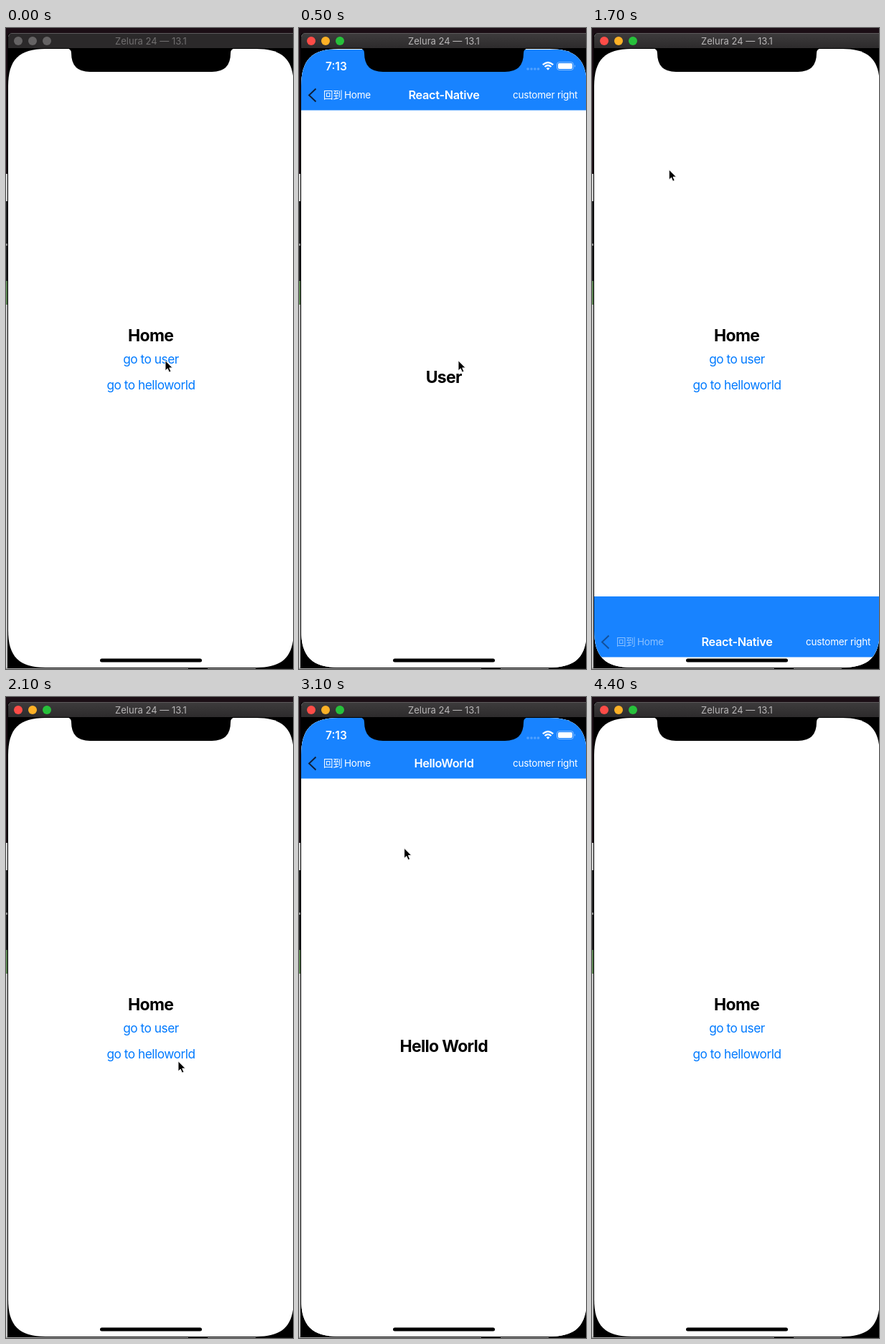
These frames come from a looping animation (400 px wide and 892 px high, 4.6 s). An HTML page:

```html
<!DOCTYPE html>
<html lang="en">
<head>
<meta charset="utf-8">
<title>Modal navigation</title>
<style>
  html, body { margin: 0; width: 100%; height: 100%; overflow: hidden; background: #000; }
  svg { display: block; width: 400px; height: 892px; }
  text { font-family: Inter, "Noto Sans CJK SC", "Noto Sans CJK", sans-serif; }
  .mid { text-anchor: middle; }
  .heading { font-size: 23px; font-weight: 700; letter-spacing: -.7px; }
  .link { font-size: 17.3px; letter-spacing: -.5px; fill: #007aff; }
  .title { font-size: 16.3px; font-weight: 600; letter-spacing: -.3px; fill: #fff; }
  .small { font-size: 13.5px; letter-spacing: -.2px; fill: #fff; }
  .clock { font-size: 15.5px; font-weight: 600; fill: #fff; }
  .caption { font-size: 13px; fill: #b8b6b7; }
  .inactive .caption { fill: #706e6f; }
  .inactive .light { fill: #656364; }
  .inactive .bar { fill: #2b292a; }
</style>
</head>
<body>
<svg viewBox="0 0 400 892">
  <defs>
    <linearGradient id="barFill" x2="0" y2="1">
      <stop stop-color="#3d3b3c"/><stop offset="1" stop-color="#2d2b2c"/>
    </linearGradient>
    <clipPath id="screen">
      <path d="M3 81C3 44.200 18.200 29 55 29H349C385.800 29 401 44.200 401 81V838C401 874.800 385.800 890 349 890H55C18.200 890 3 874.800 3 838Z"/>
    </clipPath>
  </defs>

  <!-- desktop behind the window -->
  <rect width="400" height="892" fill="#1b0e15"/>
  <rect y="203" width="3" height="38" fill="#d2d2d2"/>
  <rect y="241" width="3" height="111" fill="#1d1d1f"/>
  <rect y="300" width="2" height="3" fill="#8a8a8a"/>
  <rect y="352" width="3" height="33" fill="#58804f"/>
  <rect y="385" width="3" height="507" fill="#c4c4c4"/>
  <rect y="890" width="400" height="2" fill="#a8a8a8"/>
  <path d="M254 890h27v2h-27zM348 890h52v2h-52z" fill="#111"/>

  <!-- window -->
  <g id="window">
    <path d="M2 891V12Q2 7 7 7H400V891Z" fill="#000"/>
    <path class="bar" d="M3 28V13Q3 8 8 8H400V28Z" fill="url(#barFill)"/>
    <path d="M3.500 12Q4 7.500 8 7.500H400" fill="none" stroke="#5d5a5c"/>
    <circle class="light" cx="17" cy="18" r="6" fill="#fd4c47"/>
    <circle class="light" cx="37" cy="18" r="6" fill="#fdb126"/>
    <circle class="light" cx="57" cy="18" r="6" fill="#27c13b"/>
    <text class="caption mid" x="202" y="23">Zelura 24 — 13.1</text>
  </g>

  <g clip-path="url(#screen)">
    <rect x="3" y="29" width="398" height="861" fill="#fff"/>
    <text class="heading mid" x="201.700" y="436">Home</text>
    <text class="link mid" x="202" y="467">go to user</text>
    <text class="link mid" x="202" y="503">go to helloworld</text>
    <g id="sheets"></g>

    <!-- white status bar, only visible over a blue header -->
    <text class="clock" x="37" y="58.500">7:13</text>
    <g fill="#fff">
      <g opacity=".25">
        <circle cx="319" cy="57" r="1.800"/><circle cx="324" cy="57" r="1.800"/>
        <circle cx="328.800" cy="57" r="1.800"/><circle cx="333.500" cy="57" r="1.800"/>
      </g>
      <g fill="none" stroke="#fff" stroke-width="2.300">
        <path d="M339.800 51.200Q347 44.800 354.200 51.200"/>
        <path d="M342.500 54Q347 50 351.500 54"/>
      </g>
      <path d="M344.500 56.100Q347 54.200 349.500 56.100L347 58.700Z"/>
      <rect x="359.500" y="47.500" width="23" height="11" rx="3.300" fill="none" stroke="#fff" opacity=".45"/>
      <path d="M384 51.300Q386 53 384 54.800Z" opacity=".5"/>
      <rect x="361" y="49" width="20" height="8" rx="2"/>
    </g>
  </g>

  <path d="M85 28.500Q91 29 91 35Q91 61 117 61H287Q313 61 313 35Q313 29 319 28.500Z"/>
  <rect x="131" y="877.500" width="142" height="5" rx="2.500"/>
  <path id="cursor" d="M0 0V14.200L3.200 11.200L5.400 16.300L7.900 15.200L5.700 10.200H10.200Z" stroke="#fff" stroke-width=".9"/>
</svg>

<script>
const LOOP = 4600, STEP = 100, SLIDE = 400, HEIGHT = 861;

const sheets = [
  { title: "React-Native", heading: "User", open: 130, close: 1552 },
  { title: "HelloWorld", heading: "Hello World", open: 2500.3, close: 3676.4 }
];

// time, x, y
const path = [
  [0, 222, 463], [700, 222, 463], [1000, 130, 240], [1300, 66, 96],
  [1600, 66, 96], [1900, 190, 400], [2100, 240, 507], [2300, 236, 503],
  [2500, 227, 494], [2700, 227, 494], [3000, 180, 256], [3300, 80, 120],
  [3500, 47, 90], [3800, 47, 90], [4100, 415, 30], [4600, 415, 30]
];

const $ = id => document.getElementById(id);
const clamp = v => Math.min(1, Math.max(0, v));
const mix = (a, b, k) => a + (b - a) * k;

function bezier(x1, y1, x2, y2) {
  const at = (a, b, s) => 3 * a * s * (1 - s) ** 2 + 3 * b * s * s * (1 - s) + s ** 3;
  return x => {
    if (x <= 0 || x >= 1) return clamp(x);
    let lo = 0, hi = 1;
    for (let i = 0; i < 24; i++) {
      const s = (lo + hi) / 2;
      if (at(x1, x2, s) < x) lo = s; else hi = s;
    }
    return at(y1, y2, lo);
  };
}
const ease = bezier(0.2833, 0.99, 0.31833, 0.99);

$("sheets").innerHTML = sheets.map(s => `
  <g>
    <rect x="3" y="29" width="398" height="862" fill="#fff"/>
    <rect x="3" y="29" width="398" height="84.500" fill="#1883ff"/>
    <g class="back">
      <path d="M23.500 83.500L14 92.500L23.500 101.500" fill="none" stroke="#0d1d38" stroke-width="1.900"/>
      <text class="small" x="34" y="97">回到</text>
      <text class="small" x="63" y="97">Home</text>
    </g>
    <text class="title mid" x="202" y="98">${s.title}</text>
    <text class="small" x="298" y="97">customer right</text>
    <text class="heading mid" x="201.700" y="493.500">${s.heading}</text>
  </g>`).join("");
sheets.forEach((s, i) => {
  s.node = $("sheets").children[i];
  s.back = s.node.querySelector(".back");
});

function cursorAt(t) {
  const i = path.findIndex(p => p[0] > t);
  const [a, b] = [path[i - 1], path[i]];
  const k = (t - a[0]) / (b[0] - a[0]);
  return [mix(a[1], b[1], k), mix(a[2], b[2], k)];
}

function draw(t) {
  for (const s of sheets) {
    const shown = ease((t - s.open) / SLIDE) - ease((t - s.close) / SLIDE);
    s.node.setAttribute("transform", `translate(0 ${(HEIGHT * (1 - shown)).toFixed(2)})`);
    s.node.style.display = shown > 0 ? "" : "none";
    // the pressed back button dims, then recovers
    const since = t - s.close;
    s.back.setAttribute("opacity", since < 0 ? 1 : mix(0.18, 1, clamp((since - 50) / 250)));
  }
  const [x, y] = cursorAt(t);
  $("cursor").setAttribute("transform", `translate(${x} ${y - 0.3})`);
  $("window").setAttribute("class", t < STEP ? "inactive" : "");
}

const start = performance.now();
function tick() {
  const t = (performance.now() - start) % LOOP;
  draw(Math.floor(t / STEP) * STEP);
  requestAnimationFrame(tick);
}
tick();
</script>
</body>
</html>
```
